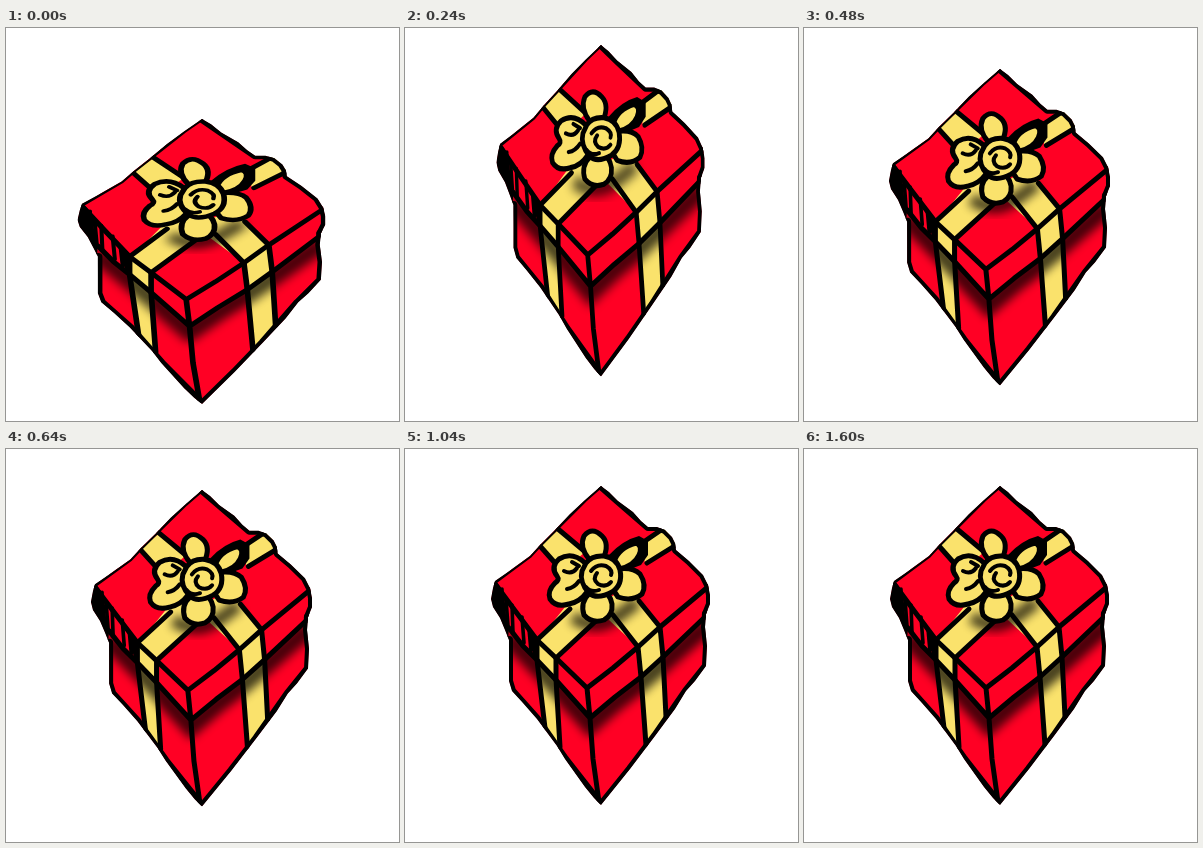
Write an HTML page that moves like this. It is 393x393 px and loops after 1920 ms.

```html
<!DOCTYPE html>
<html lang="en">
<head>
<meta charset="utf-8">
<title>Gift box</title>
<style>
  html, body { margin: 0; width: 100%; height: 100%; overflow: hidden; background: #fff; }
  svg { display: block; width: 100%; height: 100%; }
  .line { fill: none; stroke: #000; stroke-width: 5; stroke-linecap: round; stroke-linejoin: round; }
  .red { fill: #ff0024; }
  .gold { fill: #fae26c; }
  .petal { fill: #fae26c; stroke: #000; stroke-width: 5; stroke-linejoin: round; }
  .shade { fill: none; stroke: #000; filter: url(#soft); }
</style>
</head>
<body>
<svg viewBox="0 0 393 393">
  <defs>
    <filter id="soft" x="-30%" y="-50%" width="160%" height="200%"><feGaussianBlur stdDeviation="5"/></filter>
    <path id="body" d="M196 37 L204 43 213 52 228 63 236 72 243 78 252 78 260 81 267 88 270 94 271 101 284 112 298 126 303 136 305 146 305 155 301 165 300 178 302 197 301 217 290 232 281 242 270 260 250 287 225 320 196 356 189 349 180 338 160 310 152 297 132 270 118 254 107 242 104 232 104 191 100 181 95 169 88 158 86 150 88 139 90 132 103 123 125 107 136 95 150 81 165 65 180 51Z"/>
    <clipPath id="cut"><use href="#body"/></clipPath>
  </defs>
  <g id="gift">
    <g clip-path="url(#cut)">
      <use href="#body" class="red"/>

      <!-- ribbons on the box sides -->
      <path class="gold" d="M132 208 L151 228 155 298 140 279Z M236 228 L258 208 261 268 241 296Z"/>

      <!-- shadow below the lid -->
      <path class="shade" stroke-width="18" opacity=".72" d="M104 188 L131 217 150 237 185 276 L210 254 236 234 258 215 302 176"/>

      <!-- lid -->
      <path class="red" d="M90 135 L196 37 304 136 302 165 258 208 236 228 185 269 150 229 131 209 104 178Z"/>
      <path class="gold" d="M136 96 L153 81 180 103 158 122Z M236 93 L260 78 271 95 240 114Z"/>
      <path class="gold" d="M133 192 L160 158 180 145 195 169 151 209 150 229 133 210Z M190 158 L222 138 234 152 255 178 258 208 236 228 233 198Z"/>
      <path class="shade" stroke-width="13" opacity=".7" d="M168 168 Q192 185 216 165 L232 153"/>

      <!-- edges -->
      <path class="line" d="M91 136 L111 163 132 191 151 209 182 239 L208 219 233 198 255 178 304 137
        M104 179 L118 197 131 210 150 230 185 269 L210 248 236 228 258 208 302 166
        M182 239 L185 269 188 310 194 353"/>
      <path class="line" d="M132 191 L165 160 M151 209 L193 170 M208 166 L233 198 236 228 241 296 M234 152 L255 178 258 208 261 268
        M132 191 L132 211 140 279 M151 209 L151 230 155 298"/>
      <path class="line" d="M135 97 L158 123 M153 80 L178 101 M240 92 L259 79 M242 114 L271 96"/>

      <!-- rough left corner -->
      <path d="M86 134 L91 132 99 143 101 166 104 178 103 192 97 177 85 157Z"/>
      <path class="line" style="stroke-width:3.6" d="M101 150 L103 177 M107 156 L108 184 M117 168 L119 194 M124 180 L126 202 M97 140 L97 164 M128 187 L130 206"/>

      <!-- outer contour -->
      <path class="line" style="stroke-width:4" d="M90 133 L125 107 136 95 150 81 180 51 196 37"/>
      <path class="line" style="stroke-width:8" d="M196 37 L213 52 243 78 L252 78 260 81 267 88 270 94 271 101 284 112 298 126 303 136 305 146 305 155 301 165"/>
      <path class="line" style="stroke-width:8" d="M301 165 L300 178 302 197 301 217 281 242 250 287 225 320 196 356 160 310 132 270 107 242 104 232 104 191"/>
    </g>

    <!-- bow -->
    <path d="M204 106 Q218 91 234 87 L243 92 243 106 236 116 212 125Z"/>
    <path class="petal" d="M184 110 Q174 98 179 87 Q187 77 197 87 Q205 95 198 110Z"/>
    <path class="petal" d="M209 113 Q213 99 231 94 Q238 97 234 106 Q229 117 214 120Z"/>
    <path class="petal" stroke-linecap="round" d="M180 114 Q167 102 154 110 Q145 118 152 127 Q155 131 150 134 Q142 142 145 150 Q151 159 164 155 Q175 153 182 143"/>
    <path class="petal" d="M213 120 Q228 118 235 125 Q242 136 237 145 Q227 153 213 148 L205 136Z"/>
    <path class="petal" d="M184 145 Q175 153 179 166 Q187 175 199 171 Q208 166 207 155 Q205 144 197 143Z"/>
    <path class="petal" d="M181 114 Q187 106 199 107 Q212 109 215 121 Q218 136 207 143 Q192 151 184 144 Q174 133 177 122Z"/>
    <path class="line" style="stroke-width:4" d="M186 122 Q192 114 201 117 Q208 121 206 126 M192 124 Q187 130 193 135 Q201 139 206 133 M181 138 Q186 144 194 141"/>
    <path class="line" style="stroke-width:4" d="M159 122 Q167 126 172 119 M167 113 L174 117 M162 140 Q169 139 174 132"/>
  </g>
</svg>
<script>
  const LOOP = 1920, STEP = 80, MID = 195.75, TOP = 37, BOTTOM = 356, RISE = 54;
  const gift = document.getElementById('gift');

  // Remaining distance of an elastic ease-out: 1 is fully squashed, 0 is at rest.
  const elastic = x => -(2 ** (-10 * x)) * Math.sin((10 * x - 0.75) * 2 * Math.PI / 3);

  function draw(now) {
    const t = Math.floor(now % LOOP / STEP) * STEP;
    const q = Math.floor(RISE * elastic(t / LOOP) + 1e-9) / RISE;
    const top = TOP + RISE * q;
    const sx = 1 + 0.132 * q;
    const sy = (BOTTOM + 20 * q - top) / (BOTTOM - TOP);
    gift.setAttribute('transform', `matrix(${sx} 0 0 ${sy} ${MID * (1 - sx)} ${top - TOP * sy})`);
  }

  const start = performance.now();
  function tick() {
    draw(performance.now() - start);
    requestAnimationFrame(tick);
  }
  tick();
</script>
</body>
</html>
```
